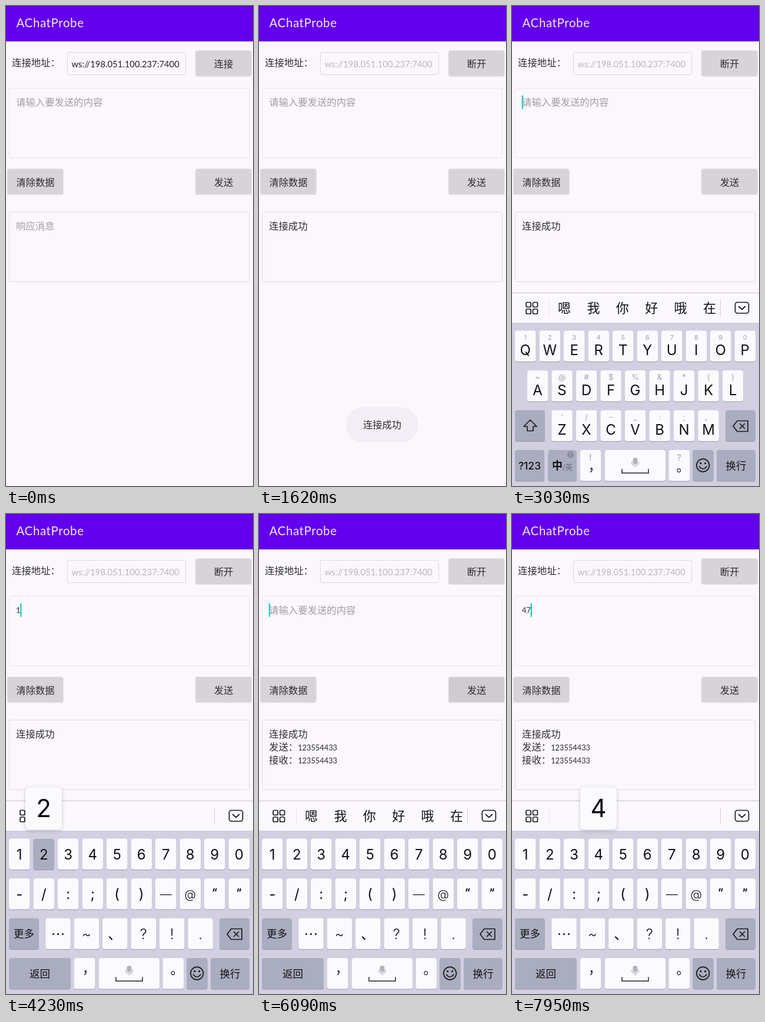
An HTML page that plays this animation: 420x814 px, repeating every 8 s.

```html
<!DOCTYPE html>
<html lang="zh-CN">
<head>
<meta charset="utf-8">
<style>
html, body { margin: 0; width: 100%; height: 100%; overflow: hidden; background: #fbf7fd; }
svg { display: block; width: 100%; height: 100%; }
text { font-family: Lato, "Noto Sans CJK SC", "Noto Sans CJK", sans-serif; white-space: pre; }
.kb text { font-family: Inter, "Noto Sans CJK SC", "Noto Sans CJK", sans-serif; }
.kb .thin { font-weight: 300; }
.kb .quote { font-family: Roboto, sans-serif; }
.key { filter: drop-shadow(0 1.3px .3px #9a98ab); }
.btn { filter: drop-shadow(0 .7px 1.1px #0005); }
.pop { filter: drop-shadow(0 2px 3px #0003); }
.line { fill: none; stroke: #18181c; stroke-width: 1.7; stroke-linejoin: round; stroke-linecap: round; }
</style>
</head>
<body>
<svg id="stage" viewBox="0 0 420 814"></svg>
<script>
const LOOP = 8000, INK = '#2e2b33', HINT = '#a09da4', GREY = '#a9adbf', KEY = '#fbfaff', BLACK = '#101014';
const stage = document.getElementById('stage');

// digit, finger down, finger up (digit is entered), bubble gone
const taps = [
  [1, 3930, 3990, 4050], [2, 4200, 4290, 4350], [3, 4350, 4440, 4470],
  [5, 4500, 4560, 4590], [5, 4620, 4710, 4890], [4, 4890, 4920, 4950],
  [4, 4980, 5010, 5040], [3, 5040, 5130, 5190], [3, 5190, 5280, 5430],
  [4, 7710, 7770, 7800], [7, 7830, 7890, 7920], [4, 7950, 8000, 8000]
];
const SENT = 5850, OPEN = 2730, NUMERIC = 3570;
const blinks = [[150, 660], [1140, 1620], [2100, 2580], [2790, 3480], [3960, 5760],
  [5850, 6390], [6870, 7350], [7770, 8000]];

const within = (t, a, b) => t >= a && t < b;
const ramp = (t, a, b) => Math.min(1, Math.max(0, (t - a) / (b - a)));
const rect = (x, y, w, h, r, fill, more = '') =>
  `<rect x="${x}" y="${y}" width="${w}" height="${h}" rx="${r}" fill="${fill}" ${more}/>`;
const text = (s, x, y, size, fill = INK, anchor = 'start', more = '') =>
  `<text x="${x}" y="${y}" font-size="${size}" fill="${fill}" text-anchor="${anchor}" ${more}>${s}</text>`;
const mid = (s, x, y, size, fill, more) => text(s, x, y + size * .364, size, fill, 'middle', more);
const line = (d, more = '') => `<path class="line" d="${d}" ${more}/>`;
const key = (x, y, w, fill = KEY) => rect(x, y, w, 52.5, 4, fill, 'class="key"');
const esc = s => s.replace('&', '&amp;');

function button(label, x, y, press) {
  return rect(x + .5, y + .5, 93.5, 42, 2, '#d8d3d9', 'class="btn"') +
    rect(x + .5, y + .5, 93.5, 42, 2, '#000', `opacity="${press}"`) +
    text(label, x + 47.5, y + 28, 16.3, INK, 'middle');
}

function field(x, y, w, h, stroke) {
  return rect(x, y, w, h, 2.5, 'none', `stroke="${stroke}"`);
}

function page(t) {
  const online = t >= 750, sent = t >= SENT;
  const typed = taps.filter(p => t >= p[2] && (p[1] > SENT) === sent).map(p => p[0]).join('');
  const connectPress = .09 * ramp(t, 120, 240) * (1 - ramp(t, 300, 450));
  const sendPress = .1 * ramp(t, 5790, 5880) - .06 * ramp(t, 5910, 6090) - .04 * ramp(t, 7710, 7770);
  const reply = (label, y) => text(`${label}：<tspan font-size="12.8">123554433</tspan>`, 17, y, 16.4);
  let s = rect(0, 0, 420, 814, 0, '#fbf7fd') +
    rect(0, 60, 420, 1, 0, '#f1ebf8') + rect(0, 0, 420, 60, 0, '#6200ee') +
    text('AChatProbe', 17.5, 35.5, 20.5, '#f4eaff', 'start', 'letter-spacing=".6"') +
    text('连接地址：', 10, 101.5, 16.4) +
    field(104.5, 78.5, 201, 38, '#dcd8df') +
    text('ws://198.051.100.237:7400', 111.5, 103.5, 14.8, online ? '#b9b6bd' : '#242128') +
    button(online ? '断开' : '连接', 322.5, 76, connectPress) +
    field(5.5, 139.5, 408, 118, '#e8e4ea') +
    (typed ? text(typed, 17, 168, 12.9) : text('请输入要发送的内容', 17, 169.3, 16.4, HINT)) +
    button('清除数据', 2.5, 276.5, 0) +
    button('发送', 322.5, 276.5, sendPress) +
    field(5.5, 349.5, 408, 118, '#dfdbe2') +
    (online ? text('连接成功', 17, 379.3, 16.4) : text('响应消息', 17, 379.3, 16.4, HINT));
  if (sent) s += reply('发送', 401);
  if (t >= 5910) s += reply('接收', 422.6);
  if (blinks.some(b => within(t, ...b)))
    s += rect(16.7 + 7.48 * typed.length, 151.5, 2.3, 23, 0, '#1fcfbd');
  return s;
}

// a row of white keys, each with an optional small hint above
function row(chars, x, y, step, w, { hints, size = 24, style = '' } = {}) {
  return [...chars].map((c, i) => {
    const kx = x + i * step, cx = kx + w / 2;
    return key(kx, y, w) + mid(c, cx, y + (hints ? 33 : 26.5), size, BLACK, `class="${style}"`) +
      (hints ? mid(esc(hints[i]), cx, y + 11.5, hints[0] === '1' ? 11 : 13, '#a09daa') : '');
  }).join('');
}

function letters(t) {
  return row('QWERTYUIOP', 5, 550.5, 41.5, 35.5, { hints: '1234567890' }) +
    row('ASDFGHJKL', 25.8, 618, 41.5, 35.5, { hints: '~@#$%&*()' }) +
    row('ZXCVBNM', 67.3, 685.5, 41.5, 35.5, { hints: "'/-_:;、" }) +
    key(5, 685.5, 51, GREY) + line('M31 702L20 713H26V720.5H36V713H42Z') +
    key(5, 753, 50, t >= 3480 ? '#8f93a8' : GREY) +
    mid('?123', 30, 779.5, 17.5, BLACK, 'font-weight="500"') +
    key(61.5, 753, 48.5, GREY) + mid('中', 77, 779.5, 18, BLACK, 'font-weight="700"') +
    mid('/英', 94.5, 782, 12.5, '#666a7c') +
    '<g fill="none" stroke="#6d7182"><circle cx="99.5" cy="761" r="4.8"/><ellipse cx="99.5" cy="761" rx="2.2" ry="4.8"/><path d="M95 761h9"/></g>';
}

function numbers(t) {
  const tap = taps.find(p => within(t, p[1] + 30, p[2]));
  let s = row('1234567890', 5, 550.5, 41.5, 35.5);
  if (tap) {
    const x = 5 + (tap[0] - 1) * 41.5;
    s += key(x, 550.5, 35.5, GREY) + mid(tap[0], x + 17.75, 577, 24, BLACK);
  }
  return s + row('-/:;()', 5, 618, 41.5, 35.5) +
    row('—@', 254, 618, 41.5, 35.5, { size: 20, style: 'thin' }) +
    row('“”', 337, 618, 41.5, 35.5, { style: 'quote' }) +
    row('⋯~、?!.', 67.3, 685.5, 48.4, 42.5, { style: 'thin' }) +
    key(5, 685.5, 51, GREY) + mid('更多', 30.5, 712, 17.5, BLACK) +
    key(5, 753, 105, GREY) + mid('返回', 57.5, 779.5, 17.5, BLACK);
}

function keyboard(t) {
  const numeric = t >= NUMERIC, drop = numeric ? 0 : 9;
  const slide = 328 * (1 - ramp(t, OPEN, 3000)) ** 2;
  let s = `<g class="kb" transform="translate(0 ${slide})">` +
    rect(0, 486, 420, 52, 0, '#fbf9fd') + rect(0, 486, 420, 1, 0, '#c6c4cb') +
    rect(0, 537, 420, 277, 0, '#d2cfe0') +
    rect(63, 498, 1, 28, 0, '#e6e4ea') + rect(354, 498, 1, 28, 0, '#d3d1d8');
  for (const x of [24, 35.5]) for (const y of [502.5, 514])
    s += rect(x, y, 8, 8, 2, 'none', 'class="line"');
  s += rect(379.5, 502.5, 23, 18.5, 4, 'none', 'class="line"') + line('M385.5 509.5L391 514.5L396.5 509.5');
  if (t < 3960 || within(t, 5880, 7740))
    s += [...'嗯我你好哦在'].map((c, i) => mid(c, 89 + i * 49.4, 512, 22, '#121215')).join('');
  s += numeric ? numbers(t) : letters(t);
  s += key(363, 685.5, 51, GREY) + line('M376 712.5L383 703.5H401V721.5H383Z') +
    line('M387.5 708.5l8 8m0-8l-8 8') +
    key(116, 753, 35.5) + text('，', 129.8, 779 + drop, 22, BLACK) +
    key(158, 753, 103) + rect(205.5, 766, 8, 11, 4, '#b3b1bc') +
    line('M203.5 773q0 6 6 6t6-6M209.5 779v3', 'style="stroke:#b3b1bc;stroke-width:1.2"') +
    line('M187 786v6h45v-6', 'style="stroke:#555561;stroke-width:2;stroke-linejoin:miter"') +
    key(266.5, 753, 35.5) + text('。', 279.5, 780 + drop, 22, BLACK);
  if (!numeric) s += mid('!', 133.5, 766, 15, '#a09daa') + mid('?', 284, 766, 15, '#a09daa');
  s += key(307, 753, 35.5, GREY) + '<circle class="line" cx="324.7" cy="779" r="10.8"/>' +
    line('M318.5 781q6.2 8 12.4 0') +
    '<circle cx="320.8" cy="775.5" r="1.5"/><circle cx="328.6" cy="775.5" r="1.5"/>' +
    key(348, 753, 66, GREY) + mid('换行', 381, 779.5, 17.5, BLACK);
  const tap = taps.find(p => within(t, p[1], p[3]));
  if (tap) {
    const x = Math.max(5, tap[0] * 41.5 - 50);
    s += rect(x, 463.5, 62, 71.5, 6, '#fbfaff', 'class="pop"') + mid(tap[0], x + 31, 499, 42, '#0c0c0f');
  }
  return s + '</g>';
}

function toast(t) {
  const alpha = ramp(t, 780, 1140) * (1 - ramp(t, OPEN, 2910));
  return alpha ? `<g opacity="${alpha}">` + rect(149.5, 681.5, 120, 57, 26, '#f3eef5', 'stroke="#eee9f0"') +
    text('连接成功', 209.5, 716.3, 16.3, INK, 'middle') + '</g>' : '';
}

let shown;
function draw() {
  const t = performance.now() % LOOP;
  const s = page(t) + (t >= OPEN ? keyboard(t) : '') + toast(t);
  if (s !== shown) stage.innerHTML = shown = s;
  requestAnimationFrame(draw);
}
draw();
</script>
</body>
</html>
```
